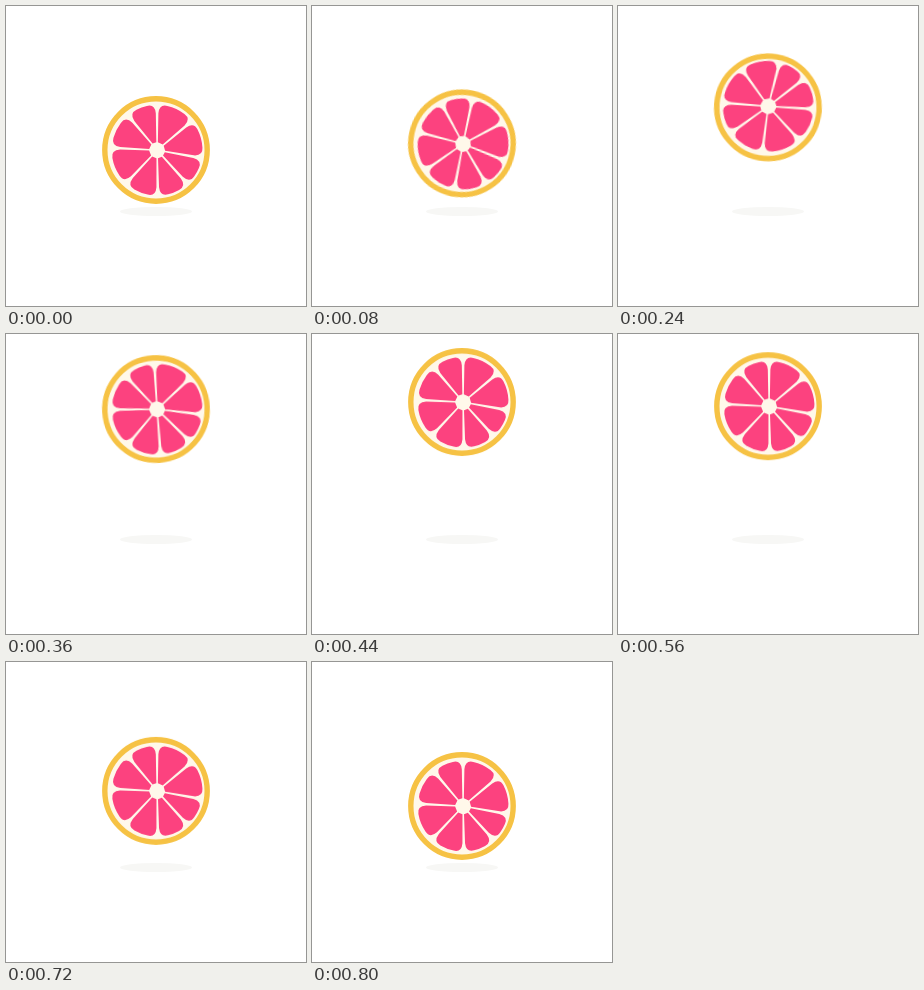
An HTML page for the animation above (1 s loop, 300 px wide and 300 px high).

```html
<!DOCTYPE html>
<html lang="en">
<head>
<meta charset="utf-8">
<title>Bouncing grapefruit</title>
<style>
  html, body { margin: 0; width: 100%; height: 100%; overflow: hidden; background: #fff; }
  svg { display: block; width: 100%; height: 100%; }
</style>
</head>
<body>
<svg viewBox="0 0 300 300">
  <ellipse cx="150" cy="205.5" rx="36" ry="4.5" fill="#f7f7f5"/>
  <g id="fruit">
    <circle r="51.2" fill="#fff8ea" stroke="#f6c244" stroke-width="5.4"/>
    <path id="pulp" transform="translate(1.1 .2)" fill="#fc427f"/>
  </g>
</svg>
<script>
  const LOOP = 1000, STEP = 40;
  const LOW = 144, HIGH = 68;

  // Directions of the membranes between segments, in degrees clockwise from the right.
  const walls = [-90, -40, 10, 48, 89, 133, 183, 230, 270];

  const at = (r, deg) => {
    const a = deg * Math.PI / 180;
    return (r * Math.cos(a)).toFixed(2) + ' ' + (r * Math.sin(a)).toFixed(2);
  };

  function segment(a, b) {
    return `M${at(8, a + 5.5)}L${at(37, a + 2)}Q${at(46.3, a + 2.8)} ${at(45.4, a + 13)}` +
      `A45.4 45.4 0 0 1 ${at(45.4, b - 13)}Q${at(46.3, b - 2.8)} ${at(37, b - 2)}L${at(8, b - 5.5)}Z`;
  }

  document.getElementById('pulp').setAttribute('d',
    walls.slice(1).map((b, i) => segment(walls[i], b)).join(''));

  // Symmetric cubic-bezier(pull, 0, 1 - pull, 1) between two times.
  function ease(t, from, to, pull) {
    const x = Math.min(1, Math.max(0, (t - from) / (to - from)));
    let lo = 0, hi = 1;
    for (let i = 0; i < 30; i++) {
      const u = (lo + hi) / 2, v = 1 - u;
      const bx = 3 * pull * u * v * v + 3 * (1 - pull) * u * u * v + u * u * u;
      if (bx < x) lo = u; else hi = u;
    }
    return hi * hi * (3 - 2 * hi);
  }

  function pose(t) {
    const lift = ease(t, 0, 444, 1 / 3) - ease(t, 520, 800, 1 / 3);
    const y = LOW + (HIGH - LOW) * lift;
    const turn = 360 * ease(t, 0, 406, 0.72);
    return `translate(150px, ${y.toFixed(2)}px) rotate(${turn.toFixed(2)}deg)`;
  }

  const frames = [];
  for (let t = 0; t <= LOOP; t += STEP) {
    frames.push({ offset: t / LOOP, transform: pose(t), easing: 'step-end' });
  }
  document.getElementById('fruit').animate(frames, { duration: LOOP, iterations: Infinity });
</script>
</body>
</html>
```
